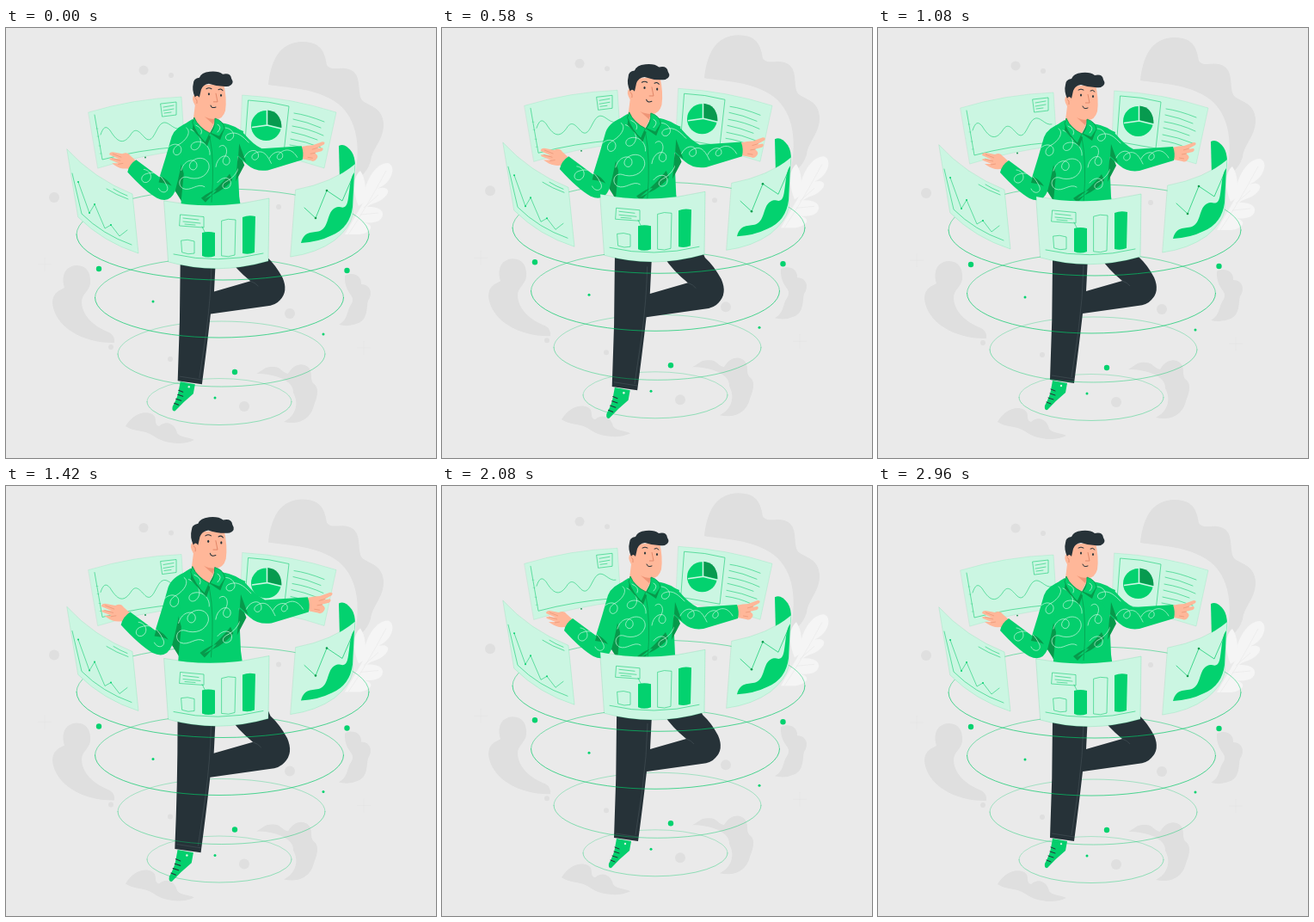
Recreate the animation shown at these times as an HTML page. Size 500 by 500 pixels, loop 3 s.

```html
<!DOCTYPE html>
<html lang="en">
<head>
<meta charset="utf-8">
<style>
  html, body { margin: 0; width: 100%; height: 100%; overflow: hidden; background: #eaeaea; }
  svg { display: block; width: 100vw; height: 100vh; }
  .line { fill: none; stroke: #03c968; stroke-width: .7; stroke-linecap: round; stroke-linejoin: round; }
  .fine { stroke-width: .55; }
  .panel { fill: #cbf6e2; }
  .green { fill: #03d26f; }
  .blob { fill: #dfdfdf; }
  .shirt { fill: #04cf6d; }
  .fold { fill: #07994b; }
  .skin { fill: #ffb799; }
  .dark { fill: #263238; }
  .ink { fill: none; stroke: #263238; stroke-width: 1; stroke-linecap: round; }
  .crease { fill: none; stroke: #4c585e; stroke-width: .5; }
  .swirl { fill: none; stroke: #cdf6e1; stroke-width: .7; stroke-linecap: round; }
</style>
</head>
<body>
<svg viewBox="0 0 500 500" xmlns="http://www.w3.org/2000/svg">
  <defs>
    <path id="torso" d="M217 107Q206 113 200 121Q195 140 198 180L204 202L202 232H276L271 196L269 150L276 121L253 112L236 124Z"/>
    <path id="leftSleeve" d="M214 110Q197 116 193 127Q186 152 179 174L152 154Q144 159 142 168Q162 190 176 198Q191 205 197 190Q204 165 207 140Z"/>
    <path id="rightSleeve" d="M250 111Q268 114 277 124Q287 136 297 141L343 138Q346 146 344 154L304 166Q290 168 281 160L266 147Z"/>
    <clipPath id="shirtShape"><use href="#torso"/><use href="#leftSleeve"/><use href="#rightSleeve"/></clipPath>
  </defs>

  <g class="float">
    <g class="blob">
      <path d="M305 66C308 38 318 16 345 16C368 16 371 31 373 43C379 52 392 42 403 50C414 58 408 75 414 84C421 91 437 91 439 110C440 130 426 139 424 155C420 168 412 174 405 176C413 140 409 106 386 88C362 70 330 70 305 66Z"/>
      <path d="M82 276C94 276 99 285 98 297C97 306 88 309 88 319C89 338 107 349 120 354Q127 358 126 366C92 367 57 349 54 320C54 308 62 305 68 302C64 289 68 277 82 276Z"/>
      <path d="M394 288C403 283 414 288 413 298C424 298 427 309 421 317C419 325 421 338 410 343Q399 348 387 345C398 339 396 329 401 322C409 310 393 311 394 288Z"/>
      <path d="M291 402C299 398 301 393 311 394C320 394 321 401 328 402C334 391 345 388 352 395C357 401 353 406 357 413C366 419 361 431 358 439C353 458 337 461 323 458C337 451 341 437 334 424C335 410 313 402 291 402Z"/>
      <path d="M139 463C147 449 161 444 170 449C177 453 171 461 178 463C187 455 197 461 199 471C204 477 211 475 219 479C204 487 181 482 171 474C160 467 150 470 139 463Z"/>
    </g>
    <g class="blob" id="greyDots"></g>
    <path d="M45 267v16M37 275h16M416 364v16M408 372h16" stroke="#e1e1e1" stroke-width=".5"/>
    <g fill="#f5f5f5">
      <path d="M416 202C415 181 429 157 444 157C455 160 449 183 428 188C443 182 449 189 440 197C433 204 425 203 420 208C435 207 442 214 436 222C431 227 421 227 414 226C430 228 426 238 411 240H394Z"/>
      <path d="M410 207C402 188 404 172 412 166C419 176 419 190 416 203Z"/>
    </g>
    <path d="M398 240Q419 209 442 166M416 209L433 194M412 217L433 215" fill="none" stroke="#e8e8e8" stroke-width=".6"/>
    <g id="ringBacks" class="line"></g>

    <path class="panel" d="M96 98Q149 82 204 80L208 142Q155 148 107 163Z"/>
    <g class="line fine">
      <path d="M96 98Q149 82 204 80L208 142Q155 148 107 163Z" stroke-opacity=".2"/>
      <path d="M103 101L112 153Q153 142 202 138"/>
      <path d="M110 124C113 115 116 113 121 119C129 132 136 137 145 124C151 114 156 122 162 128C171 136 174 116 181 111C188 106 194 119 202 117"/>
      <path d="M180 88L198 86V101L182 103ZM183 92L195 90M183 96L195 94M184 99L192 98"/>
      <path d="M105 117h2M106 126h2M108 137h2M109 146h2" stroke-opacity=".5"/>
    </g>
    <path class="panel" d="M275 78Q331 81 384 98L370 163Q325 148 272 142Z"/>
    <g class="line fine">
      <path d="M275 78Q331 81 384 98L370 163Q325 148 272 142Z" stroke-opacity=".2"/>
      <path d="M282 84Q306 85 329 91L323 145L278 137Z"/>
      <path d="M335 99Q350 101 370 109M334 106Q350 109 366 116M333 114Q352 117 369 125M332 121Q347 124 362 130M331 129Q349 132 366 139M330 136Q345 138 358 144"/>
    </g>
    <circle cx="302.500" cy="113.500" r="17.500" class="green"/>
    <path d="M304 112V95.500Q320 97 320.500 116Z" fill="#079a4f"/>
    <path d="M303.500 95V113L286 115.500M303.500 113L320 117" fill="none" stroke="#cbf6e2" stroke-width="1.600"/>
    <circle cx="162" cy="150.500" r=".9" fill="#078f46"/>
  </g>

  <g id="man">
    <path class="dark" d="M204 225H285L303 266Q313 275 321 290Q328 306 318 316Q313 322 302 323L238 332Q233 376 228 413L200 409Q203 340 203 272ZM244 266L242 306L284 294Q267 280 258 266Z" fill-rule="evenodd"/>
    <path class="crease" d="M239 276Q238 315 233 352L225 406M284 294Q290 296 293 300"/>
    <path class="crease" d="M202 404L228 408"/>
    <path class="shirt" d="M203 410L220 413L218 424Q207 433 197 444Q193 445 194 439Q200 428 201 421Z"/>
    <path class="ink" stroke-width=".8" d="M201 420L206 422M200 425L206 427M198 430L204 432M196 435L201 437"/>
    <circle cx="213" cy="416" r="1.200" fill="#d9f5e3"/>

    <path class="skin" d="M151 167L142 164Q134 165 127 160L124 158L132 158L122 154Q120 152 123 152L132 153L121 148Q121 145 125 145L136 147Q142 144 145 149L154 157Z"/>
    <path d="M124 152L134 155M125 147L135 151M131 159L137 158" fill="none" stroke="#e48f70" stroke-width=".6"/>
    <path class="skin" d="M342 139Q350 137 356 137L367 133Q371 133 369 136L360 141L367 140Q369 142 366 144L358 146Q363 149 361 152Q358 157 354 155L344 153Z"/>
    <path d="M355 142L362 140M353 147L359 146M350 151L356 152" fill="none" stroke="#e48f70" stroke-width=".6"/>

    <path class="skin" d="M222 68L253 66Q257 83 255 97Q252 108 242 107L242 113L236 124Q224 118 218 107L220 91Q215 83 219 79Z"/>
    <path d="M231 104Q236 107 243 107L241 113Z" fill="#ef9577"/>
    <use href="#torso" class="shirt"/>
    <path class="fold" d="M201 148Q193 178 197 190L204 201L207 170ZM270 142L267 179L277 160Z"/>
    <path class="fold" d="M260 170Q249 184 231 199L247 191Q258 184 263 177ZM227 198Q239 189 245 189L232 203Z"/>
    <use href="#leftSleeve" class="shirt"/>
    <use href="#rightSleeve" class="shirt"/>
    <path class="fold" d="M180 173Q188 176 193 184Q188 181 178 180ZM271 135L279 157L270 149Z"/>
    <g clip-path="url(#shirtShape)">
      <path class="swirl" d="M186 143C195 130 208 137 203 146C197 153 190 143 200 137C211 131 216 121 210 117M161 165C170 166 172 177 164 180C157 181 156 172 164 170C176 166 183 174 188 185C190 192 181 194 178 187"/>
      <path class="swirl" d="M204 166C208 151 224 152 222 162C219 170 209 163 216 156C225 148 238 153 236 164C233 174 222 178 211 174C202 172 199 183 206 187C215 191 223 180 231 185"/>
      <path class="swirl" d="M215 119C224 122 231 133 223 141C216 146 212 137 219 134C229 130 238 139 237 148M244 162C246 147 261 146 260 156C258 164 248 158 254 151C260 143 254 133 248 139M255 117C262 117 269 126 261 131C255 133 253 126 259 124C269 120 276 128 282 134"/>
      <path class="swirl" d="M246 180C254 170 265 176 260 185C253 191 248 183 256 179C264 175 268 169 270 164M277 151C282 140 295 141 293 151C289 158 282 151 288 147C299 140 304 150 308 158M306 152C310 143 323 142 321 151C317 157 311 151 318 146C327 139 334 144 338 151"/>
    </g>
    <path d="M237 127Q243 158 239 203" fill="none" stroke="#07994b" stroke-width=".7"/>
    <path class="fold" d="M218 112L238 127L234 138L217 119ZM243 112L254 118L249 131L237 123Z"/>
    <path class="shirt" d="M219 105Q224 117 237 123L232 134Q222 125 217 111ZM243 106Q253 109 254 118L248 127L238 123Q243 117 243 106Z" stroke="#07994b" stroke-width=".8"/>
    <path class="swirl" d="M221 114Q230 118 227 124M246 113Q252 116 246 122"/>

    <path class="dark" d="M220 82Q216 73 218 66Q218 60 225 59Q227 53 237 52Q247 51 252 55Q261 53 262 60Q266 66 259 69Q247 70 236 66Q229 67 227 73L225 82Q222 78 220 82Z"/>
    <path class="ink" stroke-width=".8" d="M233 72Q236 70 239 72M247 73Q250 71 252 74"/>
    <ellipse class="dark" cx="236" cy="78" rx="1" ry="1.500"/>
    <ellipse class="dark" cx="250" cy="79.500" rx="1" ry="1.500"/>
    <path d="M244 77L246 87L241 87" fill="none" stroke="#db7e60" stroke-width=".8"/>
    <path class="ink" stroke-width=".8" d="M238 91Q239 95 244 93"/>
    <path d="M220 83Q223 84 222 89" fill="none" stroke="#db7e60" stroke-width=".7"/>
  </g>

  <g class="float">
    <g id="ringFronts" class="line"></g>
    <g class="green" id="greenDots"></g>

    <path class="panel" d="M71 141Q102 175 147 193L154 262Q113 249 84 220Z"/>
    <g class="line fine">
      <path d="M71 141Q102 175 147 193L154 262Q113 249 84 220Z" stroke-opacity=".25"/>
      <path d="M77 169L88 216Q112 240 146 252"/>
      <path d="M117 187Q128 194 142 199M125 187Q133 192 141 195"/>
      <path d="M84 179L97 215L103 205L115 233L122 229L132 242L141 235"/>
    </g>
    <g class="green"><circle cx="84" cy="179" r="1"/><circle cx="97" cy="215" r="1"/><circle cx="103" cy="205" r="1"/><circle cx="122" cy="229" r="1"/></g>

    <path class="green" d="M387 137Q394 133 402 144Q406 150 406 161L402 192L388 176Z"/>
    <path class="panel" d="M337 188Q380 180 406 158L403 218Q400 232 382 247Q361 262 331 266Z"/>
    <path class="green" d="M343 250C347 235 356 239 365 236C376 232 373 213 383 209C388 206 391 211 395 207C400 202 398 176 405 168L403 208Q400 232 379 241Q363 249 343 250Z"/>
    <g class="line">
      <path d="M337 188Q380 180 406 158L403 218Q400 232 382 247Q361 262 331 266Z" stroke-opacity=".2"/>
      <path d="M347 209L360 221L373 189L391 201L404 171"/>
    </g>
    <g fill="#079d4d"><circle cx="360" cy="221" r="1.300"/><circle cx="373" cy="189" r="1.300"/></g>

    <path class="panel" d="M184 201Q243 213 306 198L305 271Q246 288 189 272Z"/>
    <g class="line">
      <path d="M184 201Q243 213 306 198L305 271Q246 288 189 272Z" stroke-opacity=".25"/>
      <path d="M203 217L230 219.500V232L202 230ZM206 221L224 223M206 225L226 227M208 228L220 229M228 231L232 239" class="fine"/>
      <path d="M204 247Q211 245 219 248V262Q212 264 205 261ZM251 224Q258 221 267 223L266 264Q259 267 251 265Z" class="fine"/>
      <path d="M195 263Q246 275 299 262" class="fine"/>
    </g>
    <path class="green" d="M228 238Q235 236 243 238V265Q235 268 228 265ZM275 220Q282 217 290 219L289 261Q282 264 275 262Z"/>
  </g>
</svg>
<script>
  const PERIOD = 3000, PHASE = 20;
  const byId = id => document.getElementById(id);

  const dots = list => list.map(([x, y, r]) => `<circle cx="${x}" cy="${y}" r="${r}"/>`).join('');
  byId('greyDots').innerHTML = dots([
    [160, 49, 5.5], [192, 55, 3], [56, 197, 6], [317, 208, 3],
    [330, 332, 6], [277, 440, 6], [122, 371, 3], [191, 385, 3]
  ]);
  byId('greenDots').innerHTML = dots([
    [108, 280, 3.2], [396.5, 282, 3.2], [266, 400, 3.2],
    [171, 318, 1.5], [369, 356, 1.5], [243, 430, 1.5]
  ]);

  // Each ring (centre, radii, line width) is split so that the figure stands inside it.
  const rings = [
    [252, 240, 170, 53, .7], [248, 313.5, 144.5, 46.5, .7],
    [250.5, 379, 120.5, 38, .45], [248, 434.5, 84, 27, .4]
  ];
  const halves = (sweep, weight) => rings.map(([x, y, rx, ry, w]) =>
    `<path stroke-width="${w * weight}" style="stroke-width:${w * weight}" d="M${x - rx} ${y}A${rx} ${ry} 0 0 ${sweep} ${x + rx} ${y}"/>`).join('');
  byId('ringBacks').innerHTML = halves(1, .7);
  byId('ringFronts').innerHTML = halves(0, 1);

  const floats = document.querySelectorAll('.float');
  const man = byId('man');
  const beat = [[0, 1], [.1, 1.1], [.3, 1], [.4, 1], [.5, 1.1], [.6, 1], [1, 1]];

  function track(keys, p) {
    const i = keys.findIndex(([at]) => at > p);
    const [p0, v0] = keys[i - 1], [p1, v1] = keys[i];
    return v0 + (v1 - v0) * (p - p0) / (p1 - p0);
  }

  function draw(now) {
    const p = ((now + PHASE) % PERIOD) / PERIOD;
    const lift = 10 * (1 - Math.abs(1 - (p * 4) % 2));
    floats.forEach(g => g.setAttribute('transform', `translate(0 ${.3 - lift})`));
    man.setAttribute('transform', `translate(246 248) scale(${track(beat, p)}) translate(-246 -248)`);
  }

  function tick() {
    draw(performance.now());
    requestAnimationFrame(tick);
  }
  tick();
</script>
</body>
</html>
```
